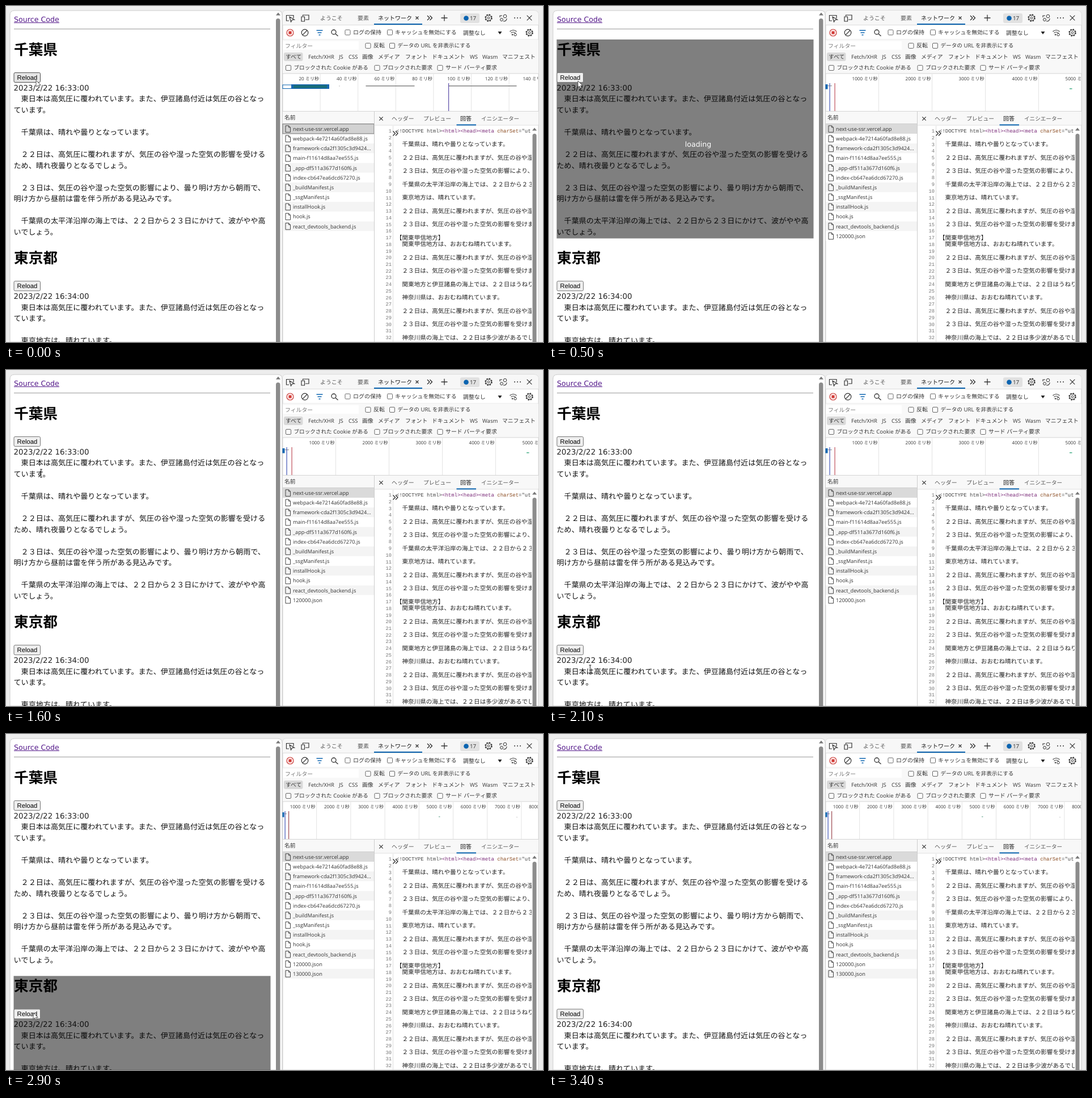
These frames come from a looping animation (947x592 px, 3500 ms). An HTML page:

```html
<!DOCTYPE html>
<html lang="ja">
<head>
<meta charset="utf-8">
<style>
  html, body { margin: 0; width: 100%; height: 100%; overflow: hidden; background: #ededed; }
  svg { display: block; }
  text { white-space: pre; text-spacing-trim: space-all; text-rendering: geometricPrecision; }
  .page { font-family: "Noto Sans CJK JP", "Noto Sans CJK", sans-serif; }
  .latin { font-family: "DejaVu Sans", sans-serif; }
  .button { font-family: "Liberation Sans", sans-serif; }
  .ui { font-family: "Open Sans", "Noto Sans CJK JP", "Noto Sans CJK", sans-serif; }
  .code { font-family: "Liberation Mono", "Noto Sans CJK JP", "Noto Sans CJK", monospace; }
</style>
</head>
<body>
<svg id="stage" width="947" height="592" viewBox="0 0 947 592"></svg>
<script>
const LOOP = 3500, STEP = 100;
const BLUE = '#0b64b0', INK = '#333';

// Drawing helpers, each returning SVG markup
const escape = s => s.replace(/&/g, '&amp;').replace(/</g, '&lt;');
const text = (cls, x, y, size, s, fill = '#111', extra = '') =>
  `<text class="${cls}" x="${x}" y="${y}" font-size="${size}" fill="${fill}" ${extra}>${escape(s)}</text>`;
const ui = (x, y, s, size = 9.8, fill = INK, extra = '') => text('ui', x, y + 3.6, size, s, fill, extra);
const rect = (x, y, w, h, fill, extra = '') =>
  `<rect x="${x}" y="${y}" width="${w}" height="${h}" fill="${fill}" ${extra}/>`;
const path = (d, stroke = INK, width = 1.1, fill = 'none') =>
  `<path d="${d}" stroke="${stroke}" stroke-width="${width}" fill="${fill}"/>`;
const circle = (x, y, r, fill, stroke = 'none', extra = '') =>
  `<circle cx="${x}" cy="${y}" r="${r}" fill="${fill}" stroke="${stroke}" ${extra}/>`;
const group = (id, content, extra = '') => `<g id="${id}" ${extra}>${content}</g>`;
const checkbox = (x, y) => rect(x - 4.5, y - 4.5, 9, 9, '#fff', 'rx="1.5" stroke="#666"');
const cross = (x, y, r, width = 1.2) => path(`M${x - r} ${y - r}l${2 * r} ${2 * r}m0 ${-2 * r}l${-2 * r} ${2 * r}`, INK, width);
const chevrons = (x, y) => path(`M${x - 4} ${y - 4}l4 4l-4 4m4.5-8l4 4l-4 4`, '#222', 1.2);
const gear = (x, y) => circle(x, y, 5.8, 'none', INK, 'stroke-width="1.8" stroke-dasharray="2.6 1.95"') +
  circle(x, y, 4.7, '#fff', INK) + circle(x, y, 1.9, 'none', INK);
const upArrow = (x, y) => path(`M${x - 4} ${y + 2.5}l4-5l4 5z`, 'none', 0, '#777');

const LINE = 19.55, SECTION = 367.3;
const forecasts = [
  { title: '千葉県', time: '2023/2/22 16:33:00', lines: [
    '　東日本は高気圧に覆われています。また、伊豆諸島付近は気圧の谷となっ',
    'ています。', '',
    '　千葉県は、晴れや曇りとなっています。', '',
    '　２２日は、高気圧に覆われますが、気圧の谷や湿った空気の影響を受ける',
    'ため、晴れ夜曇りとなるでしょう。', '',
    '　２３日は、気圧の谷や湿った空気の影響により、曇り明け方から朝雨で、',
    '明け方から昼前は雷を伴う所がある見込みです。', '',
    '　千葉県の太平洋沿岸の海上では、２２日から２３日にかけて、波がやや高',
    'いでしょう。'] },
  { title: '東京都', time: '2023/2/22 16:34:00', lines: [
    '　東日本は高気圧に覆われています。また、伊豆諸島付近は気圧の谷となっ',
    'ています。', '', '　東京地方は、晴れています。'] }
];

function forecast({ title, time, lines }, index) {
  const top = index * SECTION;
  return text('page', 14, top + 86, 25.7, title, '#000', 'font-weight="700"') +
    text('latin', 13.5, top + 149, 13.4, time, '#222') +
    lines.map((s, i) => text('page', 13.5, top + 168.4 + i * LINE, 13.08, s)).join('') +
    group('overlay' + index, rect(13.5, top + 59, 453, 350.5, '#000', 'opacity=".5"') +
      text('latin', 263, top + 247.5, 12.6, 'loading', '#fff', 'text-anchor="middle"')) +
    rect(14, top + 117.5, 46.5, 17, '#efefef', `id="button${index}" rx="2" stroke="#767676"`) +
    text('button', 19.5, top + 130, 11.3, 'Reload', '#000');
}

const browserPage = () =>
  path('M7 592V16Q7 8 15 8H479Q487 8 487 16V592z', '#ccc', 1, '#fff') +
  text('latin', 14, 27.5, 12.65, 'Source Code', '#551a8b') +
  rect(14, 29, 80, 1, '#551a8b') + rect(14, 40, 452, 1, '#999') +
  forecasts.map(forecast).join('') +
  upArrow(480, 14) + rect(476, 22, 7.5, 580, '#8c8c8c', 'rx="3.7"');

const toolbar = () =>
  path('M488 592V14Q488 8 494 8H931Q939 8 939 16V592z', '#ccc', 1, '#fff') +
  path('M488 33V14Q488 8 494 8H931Q939 8 939 16V33z', 'none', 0, '#f7f7f7') +
  rect(488, 33, 451, 1, '#ddd') + rect(488, 58.5, 451, 1, '#e4e4e4') +
  rect(488, 59.5, 451, 59.5, '#f8f8f8') + rect(488, 62, 134, 15, '#fff') +
  path('M499 26h-4.5v-9.5h12.5v5M500 19l2.5 9l2-3.5l4-.5z', INK, 1.2) +
  path('M523.5 18v-2h10.5v8h-6M521 19h5.5v8h-5.5z', INK, 1.2) +
  ui(554, 21, 'ようこそ', 9.9, '#555') + ui(620, 21, '要素', 10, '#555') +
  ui(656, 21, 'ネットワーク', 10, '#111') + rect(649, 31, 85, 2, BLUE) +
  cross(725, 21, 2.5) + chevrons(747, 21) + path('M767.5 21h11m-5.5-5.5v11', INK, 1.3) +
  rect(801, 13, 34, 17, '#e1e1e1', 'rx="3"') + circle(811.5, 21.5, 4.3, BLUE) + ui(818, 21.5, '17', 9.8) +
  gear(851, 21) + circle(880, 18, 2.8, 'none', INK) + circle(874, 24, 2.5, 'none', INK) +
  path('M877 27q6 0 6-5M871 20v-3h4', INK, 1.1) +
  [897, 902, 907].map(x => circle(x, 21, 1, INK)).join('') + cross(923, 21, 4.3) +
  circle(501, 47, 6, '#fdeaea', '#c9413d', 'stroke-width="1.2"') + rect(498.5, 44.5, 5, 5, '#d13a35') +
  circle(527, 47, 5.8, 'none', INK, 'stroke-width="1.2"') + path('M523 51l8-8') +
  path('M547.5 43h11m-9 4h7m-5 4h3', BLUE, 1.3) +
  circle(578, 46, 4, 'none', INK, 'stroke-width="1.3"') + path('M581 49l4.5 4', INK, 1.4) +
  checkbox(602.5, 46.5) + ui(612, 46.5, 'ログの保持', 10) +
  checkbox(677, 46.5) + ui(686, 46.5, 'キャッシュを無効にする', 9.9) +
  ui(806, 47, '調整なし', 9.9) + path('M867.5 45h7l-3.5 5z', 'none', 0, '#222') +
  path('M888.5 45q6-5 12 0m-10 2.5q4-3 8 0', INK, 1.2) + circle(893, 50.5, 1.2, INK) +
  circle(898, 50.5, 2.2, 'none', INK) + gear(923, 47) +
  ui(492, 70, 'フィルター', 9.9, '#777') +
  checkbox(638.5, 70) + ui(648, 69.5, '反転', 10) +
  checkbox(681, 70) + ui(690.5, 69.5, 'データの URL を非表示にする', 9.65) +
  rect(490, 82, 33.5, 15, '#d9d9d9', 'rx="3"') +
  [[493, 'すべて'], [533, 'Fetch/XHR', 9.5], [587, 'JS', 9.5], [604, 'CSS', 9.5], [628, '画像'],
   [656, 'メディア'], [704, 'フォント'], [751, 'ドキュメント'], [818, 'WS', 9.5], [840, 'Wasm', 9.5],
   [875, 'マニフェスト']].map(([x, s, size]) => ui(x, 89.5, s, size)).join('') +
  [[498, 'ブロックされた Cookie がある', 9.6], [654.5, 'ブロックされた要求'], [765.5, 'サード パーティ要求', 9.9]]
    .map(([x, s, size]) => checkbox(x, 109) + ui(x + 9.5, 108.5, s, size)).join('') +
  rect(488, 119, 451, 66.5, '#fff', 'stroke="#d5d5d5"');

// Network overview: grid lines every `gap` pixels, one label per grid line
function overview(id, gap, unit, marks) {
  let grid = '';
  for (let i = 1; i * gap < 520; i++) {
    const x = 487 + i * gap;
    grid += (x < 939 ? rect(x, 120, 1, 65, '#e3e3e3') : '') +
      ui(x - 1.5, 127.5, `${i * unit} ミリ秒`, 8.1, INK, 'text-anchor="end"');
  }
  return group(id, grid + marks, 'clip-path="url(#overviewClip)"');
}
const marker = (x, color) => rect(x, 136, 1.2, 49, color);
const overviews = () =>
  overview('span0', 66.6, 20,
    rect(488, 139, 16, 6.5, '#fff', `stroke="${BLUE}"`) + rect(503, 138, 67, 8, '#1667b1') +
    rect(507, 139.5, 59, 5, '#186d78') + rect(587, 140.5, 2, 1, '#bbb') +
    rect(634.5, 140, 86, 1.6, '#8a8a8a') + rect(780, 140, 120.5, 1.6, '#8a8a8a') + marker(780, '#5c4da8')) +
  overview('span1', 94, 1000,
    rect(487.5, 138, 4, 8.5, BLUE) + rect(492, 140, 7, 1.2, '#999') +
    marker(494.5, '#4055b5') + marker(503.5, '#c0505c') + rect(918, 145, 4.5, 1.5, '#4ab08a')) +
  overview('span2', 60.2, 1000,
    rect(487.5, 138, 3, 8.5, BLUE) + rect(491, 140, 4, 1.2, '#999') +
    marker(491.5, '#4055b5') + marker(498, '#9c4a50') + rect(763, 145, 2.5, 1.5, '#8dbba9') +
    rect(900, 146, 2, 1, '#ccc'));

const ROW = 17.15;
const files = ['next-use-ssr.vercel.app', 'webpack-4e7214a60fad8e88.js', 'framework-cda2f1305c3d9424...',
  'main-f11614d8aa7ee555.js', '_app-df511a3677d160f6.js', 'index-cb647ea6dcd67270.js', '_buildManifest.js',
  '_ssgManifest.js', 'installHook.js', 'hook.js', 'react_devtools_backend.js', '120000.json', '130000.json'];
const fileRow = (name, i) => {
  const y = 216.4 + i * ROW;
  const fill = i === 0 ? '#d9d9d9' : i % 2 ? '#fff' : '#f4f4f4';
  return group('file' + i, rect(488, y - ROW / 2, 161, ROW, fill, i ? '' : 'id="selected"') +
    path(`M493 ${y - 5.5}h5.5l3 3v8.5h-8.5zM498.5 ${y - 5.5}v3h3`, '#444', 1) +
    ui(506, y, name, 9.2));
};
const fileList = () =>
  rect(488, 186, 161, 21.5, '#f8f8f8') + ui(491, 196, '名前', 9.8) + rect(488, 207, 161, 1, '#ccc') +
  files.map(fileRow).reverse().join('') + rect(649, 186, 1, 406, '#ccc');

const sunny22 = '　２２日は、高気圧に覆われますが、気圧の谷や湿っ';
const moist23 = '　２３日は、気圧の谷や湿った空気の影響を受けます';
const response = {
  3: '　千葉県は、晴れや曇りとなっています。', 5: sunny22,
  7: '　２３日は、気圧の谷や湿った空気の影響により、曇',
  9: '　千葉県の太平洋沿岸の海上では、２２日から２３日',
  11: '　東京地方は、晴れています。', 13: sunny22, 15: moist23,
  17: '【関東甲信地方】', 18: '　関東甲信地方は、おおむね晴れています。', 20: sunny22, 22: moist23,
  24: '　関東地方と伊豆諸島の海上では、２２日はうねりを',
  26: '　神奈川県は、おおむね晴れています。', 28: sunny22, 30: moist23,
  32: '　神奈川県の海上では、２２日は多少波があるでしょ'
};
function responsePane() {
  let numbers = '', lines = '';
  for (let n = 1; n <= 32; n++) {
    const y = 220 + (n - 1) * 11.74;
    numbers += text('code', 680, y + 3.2, 8.8, String(n), '#777', 'text-anchor="end"');
    if (response[n]) lines += text('code', 688, y + 3.7, 10.55, response[n], '#222');
  }
  const html = [['<!DOCTYPE html>', '#444'], ['<html><head><meta ', '#7a2a78'], ['charSet', '#8a4b20'], ['="ut', '#444']]
    .map(([s, fill]) => `<tspan fill="${fill}">${escape(s)}</tspan>`).join('');
  return rect(650, 186, 289, 23, '#f8f8f8') + rect(650, 209.5, 289, 1, '#ddd') +
    cross(661.5, 198.5, 3.2) +
    ui(680, 198, 'ヘッダー', 9.9, '#555') + ui(736, 198, 'プレビュー', 9.8, '#555') +
    ui(801, 198, '回答', 10, '#111') + ui(838, 198, 'イニシエーター', 9.6, '#555') +
    rect(794.5, 208.5, 34.5, 2, BLUE) + rect(682, 211, 1, 381, '#ddd') + numbers +
    group('lines', `<text class="code" x="688" y="223" font-size="9">${html}</text>` + lines,
      'clip-path="url(#codeClip)"') +
    chevrons(686.5, 224.5) + upArrow(932, 217) + rect(928.5, 225, 7, 380, '#8c8c8c', 'rx="3.5"');
}

const pointers = () =>
  group('arrow', path('M0 0V11.5L2.7 9L4.6 13L6.5 12.2L4.7 8.3H8.3z', '#333', .8, '#fff')) +
  group('beam', path('M-2-7h4m-2 0v14m-2 0h4', '#222', 1));

const stage = document.getElementById('stage');
stage.innerHTML =
  `<clipPath id="overviewClip">${rect(487, 119, 451, 67, '#000')}</clipPath>` +
  `<clipPath id="codeClip">${rect(684, 211, 243, 381, '#000')}</clipPath>` +
  browserPage() + toolbar() + overviews() + fileList() + responsePane() + pointers();

// Pointer path: time, x, y
const route = [[0, 53, 131], [400, 51, 132], [1500, 51, 132], [1600, 62, 182], [1900, 75, 516],
  [2000, 75, 516], [2200, 70, 538], [2600, 48, 491], [3100, 48, 491], [3200, 50, 500], [3400, 60, 615]];
function pointerAt(t) {
  const next = route.findIndex(key => key[0] > t);
  if (next < 0) return route[route.length - 1].slice(1);
  const [t0, x0, y0] = route[next - 1], [t1, x1, y1] = route[next];
  const k = (t - t0) / (t1 - t0);
  return [x0 + (x1 - x0) * k, y0 + (y1 - y0) * k];
}

const el = id => document.getElementById(id);
const show = (id, visible) => el(id).style.display = visible ? '' : 'none';
const paint = (id, fill, stroke) => {
  el(id).setAttribute('fill', fill);
  el(id).setAttribute('stroke', stroke);
};
const REQUEST = [400, 2700], DONE = [1000, 3200];

function render(t) {
  const requests = REQUEST.filter(start => t >= start).length;
  for (let i = 0; i < 3; i++) show('span' + i, i === requests);
  for (let i = 0; i < 2; i++) {
    show('overlay' + i, t >= REQUEST[i] && t < DONE[i]);
    show('file' + (11 + i), requests > i);
  }
  paint('selected', requests ? '#dadada' : '#d2d2d2', requests ? 'none' : '#777');

  const hovered = t < REQUEST[0] || (t >= DONE[0] && t < 1600);
  paint('button0', hovered ? '#e5e5e5' : '#efefef', hovered ? '#4f4f4f' : '#767676');

  const [x, y] = pointerAt(t);
  const onButton = t < 1600 || (t >= 2600 && t < 3300);
  show('arrow', onButton);
  show('beam', !onButton);
  el(onButton ? 'arrow' : 'beam').setAttribute('transform', `translate(${x} ${y})`);
}

function tick(now) {
  render(Math.floor(now % LOOP / STEP) * STEP);
  requestAnimationFrame(tick);
}
render(0);
requestAnimationFrame(tick);
</script>
</body>
</html>
```
